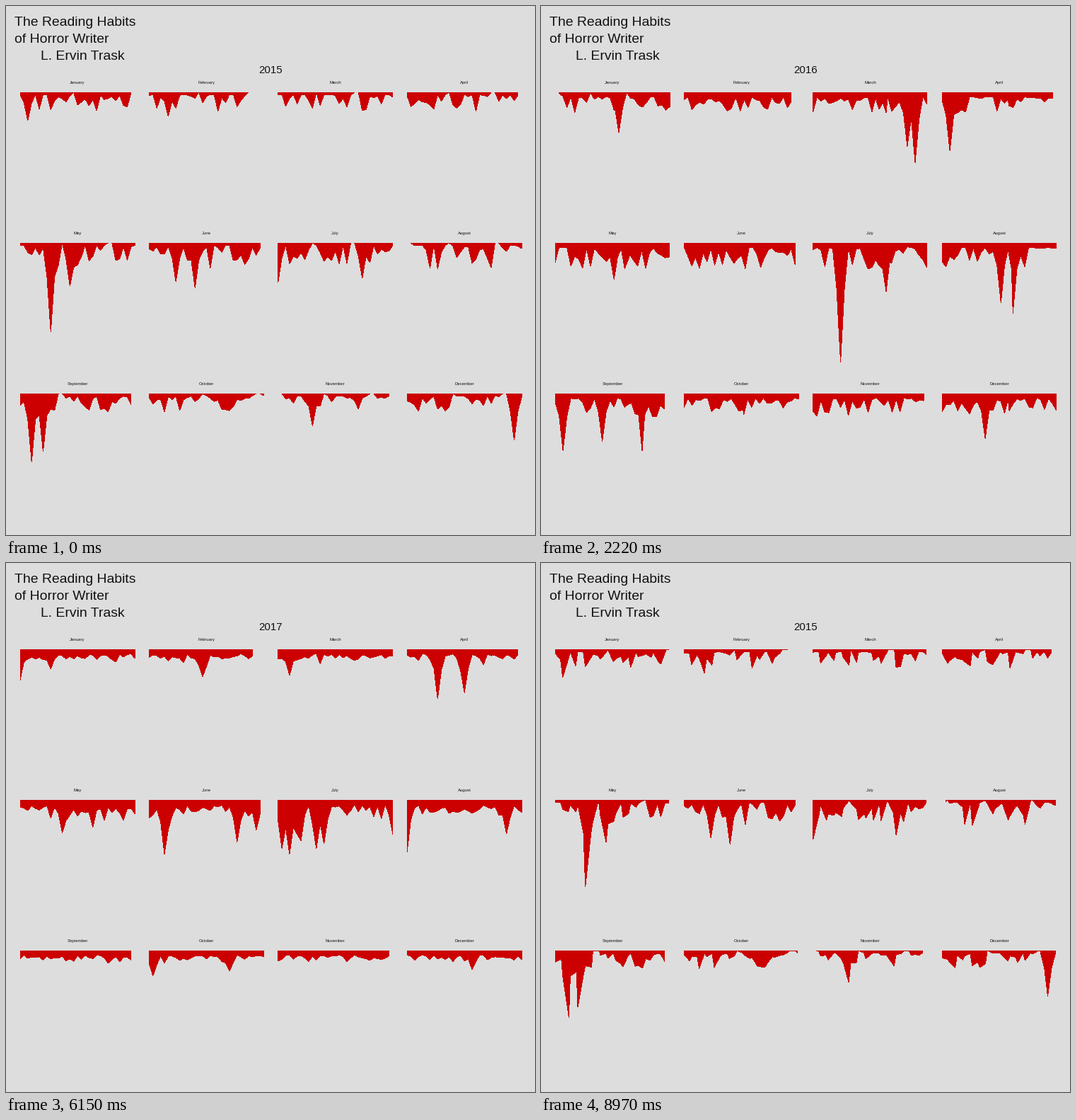
A matplotlib script that plays this animation: 748x748 px, repeating every 9 s.

```python
import matplotlib.pyplot as plt
import numpy as np
from matplotlib.animation import FuncAnimation
from matplotlib.patches import Polygon

SIZE, DPI = 748, 100
FRAMES, STEP = 300, 30
PAPER, BLOOD, INK = "#dddddd", "#cc0000", "#111111"
DAY_W, COL_W, ROW_H = 5.41, 182.35, 213
LEFT, TOP = 20, 122
MONTHS = ["January", "February", "March", "April", "May", "June", "July",
          "August", "September", "October", "November", "December"]
YEARS = [2015, 2016, 2017, 2018]
# first and last frame of each change, one per year
MOVES = [(37, 75), (113, 150), (188, 225), (263, 300)]

# size of the everyday teeth in the three rows
TEETH = {2015: (24, 34, 24), 2016: (24, 32, 28),
         2017: (16, 24, 13), 2018: (17, 24, 13)}
# longest drips: (month, day, depth)
DRIPS = {
    2015: [(1, 3, 40), (2, 6, 34), (5, 9, 126), (5, 14, 61), (6, 8, 55),
           (6, 13, 64), (7, 1, 56), (7, 23, 50), (9, 4, 97), (9, 7, 82),
           (11, 10, 46), (12, 29, 66)],
    2016: [(1, 18, 58), (3, 26, 78), (3, 28, 102), (4, 3, 85), (5, 16, 53),
           (7, 8, 173), (7, 20, 70), (8, 16, 87), (8, 20, 102), (9, 3, 82),
           (9, 13, 69), (9, 24, 83), (12, 12, 65)],
    2017: [(1, 9, 44), (3, 4, 49), (4, 9, 113), (4, 16, 108), (5, 20, 48),
           (6, 29, 70), (7, 6, 58), (8, 1, 70), (8, 27, 83), (10, 2, 60),
           (10, 22, 47), (12, 18, 42)],
    2018: [(1, 1, 82), (2, 15, 70), (5, 12, 87), (6, 5, 158), (6, 24, 120),
           (7, 2, 142), (7, 4, 155), (7, 7, 100), (7, 11, 140), (7, 13, 127),
           (7, 31, 92), (8, 1, 79)],
}
# last day without reading in each month of the first year (0: none)
LAST_GAP = [31, 28, 22, 24, 25, 0, 21, 25, 12, 30, 26, 27]
LATE_START = {(2015, 8), (2015, 11), (2016, 1)}


def last_gap(year, m):
    if year == 2015:
        return LAST_GAP[m]
    return 20 if (year, m) == (2016, 0) else 0


def month_days(year, m):
    if m == 1:
        return 29 if year % 4 == 0 else 28
    return 30 if m in (3, 5, 8, 10) else 31


def build(year, m, rng):
    """Day positions and depths of one month."""
    days = np.arange(1.0, month_days(year, m) + 1)
    low = 3 if year == 2015 else 6
    depth = low + TEETH[year][m // 4] * rng.random(len(days)) ** 2
    gap = last_gap(year, m)
    if gap:
        depth[[gap // 2 - 1, gap - 2, gap - 1]] = 0
    for month, day, peak in DRIPS[year]:
        if month == m + 1:
            depth = np.maximum(depth, peak * (1 - abs(days - day) / 1.6))
    if (year, m + 1) in LATE_START:
        days[0], depth[:2] = 2, 0
    return np.array([days, depth])


def shuffled(pts, gap):
    """Odd days first, then even days turned round the last gap."""
    days = np.arange(1, pts.shape[1] + 1)
    odd, even = days[::2], days[1::2]
    order = np.concatenate([odd, even[even > gap][::-1], even[even <= gap]])
    return pts[:, order - 1]


def blend(m, a, b, p):
    """Points of month m between years a and b, paired in row order."""
    start, end = DATA[a][m], DATA[b][m]
    if p == 0 or p == 1:
        return end if p else start
    if last_gap(a, m):
        start = shuffled(start, last_gap(a, m))
    elif last_gap(b, m):
        end = shuffled(end, last_gap(b, m))
    n = max(start.shape[1], end.shape[1])
    start, end = (np.pad(pts, ((0, 0), (0, n - pts.shape[1])), mode="edge")
                  for pts in (start, end))
    pts = (1 - p) * start + p * end
    return pts[:, np.argsort(pts[0], kind="stable")]


def outline(m, a, b, p):
    days, depth = blend(m, a, b, p)
    row, col = divmod(m, 4)
    top = TOP + ROW_H * row
    x = LEFT + COL_W * col + DAY_W * (days - 1)
    return np.column_stack([np.r_[x[0], x, x[-1]],
                            np.r_[top, top + depth, top]])


def state(frame):
    """Years before and after, and the share of the change done."""
    i = next(k for k, (_, end) in enumerate(MOVES) if frame <= end)
    start, end = MOVES[i]
    p = max(0.0, (frame - start) / (end - start))
    return YEARS[i], YEARS[(i + 1) % 4], p


def put(x, y, s, px, **kw):
    return ax.text(x, y, s, fontsize=px * 72 / DPI, color=INK,
                   family="Liberation Sans", va="baseline", **kw)


rng = np.random.default_rng(11)
DATA = {year: [build(year, m, rng) for m in range(12)] for year in YEARS}

fig = plt.figure(figsize=(SIZE / DPI, SIZE / DPI), dpi=DPI, facecolor=PAPER)
ax = fig.add_axes([0, 0, 1, 1])
ax.set_xlim(0, SIZE)
ax.set_ylim(SIZE, 0)
ax.axis("off")

put(12, 28, "The Reading Habits", 19.4)
put(12, 52, "of Horror Writer", 19.4)
put(49, 76, "L. Ervin Trask", 19.4)
label = put(374.5, 95, "2015", 15, ha="center")

shapes = []
for m, name in enumerate(MONTHS):
    row, col = divmod(m, 4)
    put(101 + COL_W * col, 110 + ROW_H * row, name, 6, ha="center")
    shape = Polygon(outline(m, 2015, 2016, 0), closed=True, facecolor=BLOOD,
                    edgecolor="none", linewidth=0, antialiased=False)
    shapes.append(ax.add_patch(shape))


def draw(frame):
    a, b, p = state(frame)
    label.set_text(str(b if p > 0.5 else a))
    for m, shape in enumerate(shapes):
        shape.set_xy(outline(m, a, b, p))
    return [label, *shapes]


anim = FuncAnimation(fig, draw, frames=FRAMES, interval=STEP, repeat=True,
                     repeat_delay=0, blit=False)
plt.show()
```
